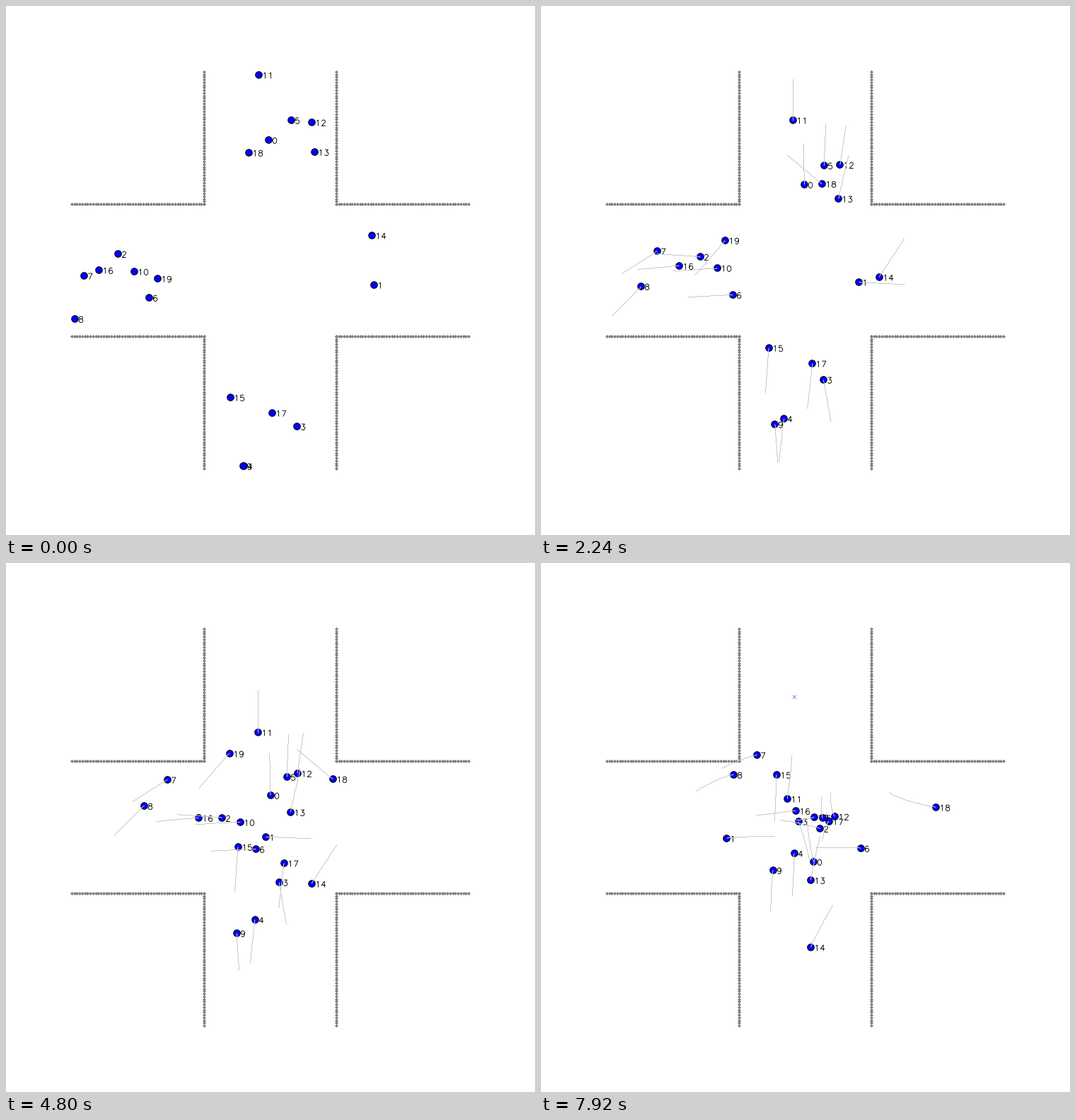
These frames come from a looping animation (748x748 px, 8 s). A matplotlib script:

```python
import numpy as np
import matplotlib.pyplot as plt
from matplotlib.animation import FuncAnimation
from matplotlib.collections import LineCollection, PolyCollection

SIZE, DPI = 748, 100
PX = 72 / DPI
FRAMES, INTERVAL = 100, 80
CROSSING, LAST = 60, FRAMES - 1
TRAIL = 25
GOAL, GOAL_WALKER, GOAL_FRAME = (358.5, 189.5), 19, 93

# Each walker: entry point, point at the CROSSING frame, point at the LAST frame.
NORTH = {
    0: [(371, 189), (374, 328), (385, 422)],
    5: [(403, 161), (397, 302), (398, 360)],
    11: [(357, 97), (356, 239), (348, 333)],
    12: [(432, 164), (412, 297), (415, 358)],
    13: [(436, 206), (402, 352), (381, 448)],
    18: [(343, 207), (462, 305), (558, 345)],
}
WEST = {
    2: [(158, 350), (305, 360), (394, 375)],
    6: [(202, 412), (353, 404), (452, 403)],
    7: [(110, 381), (228, 306), (305, 271)],
    8: [(97, 442), (195, 343), (272, 299)],
    10: [(181, 375), (331, 366), (386, 359)],
    16: [(131, 373), (272, 360), (360, 350)],
    19: [(214, 385), (316, 269), (365, 174)],
}
SOUTH = {
    3: [(411, 594), (386, 451), (364, 365)],
    4: [(336, 650), (352, 504), (358, 410)],
    9: [(335, 650), (326, 523), (328, 434)],
    15: [(317, 553), (328, 401), (333, 299)],
    17: [(376, 575), (393, 424), (407, 365)],
}
EAST = {
    1: [(520, 394), (367, 387), (262, 389)],
    14: [(517, 324), (432, 453), (381, 543)],
}


def walk(entry, crossing, end):
    """Soft start, steady pace to the crossing, then a steady turn or slow-down."""
    entry, crossing, end = map(np.array, (entry, crossing, end))
    t = np.arange(FRAMES)[:, None]
    pace = (t - 1 + np.exp(-t / 2)) / (CROSSING - 1)
    velocity = (crossing - entry) / CROSSING
    rest = LAST - CROSSING
    bend = (end - crossing - velocity * rest) / rest**2
    late = t - CROSSING
    path = np.where(late < 0, entry + (crossing - entry) * pace,
                    crossing + velocity * late + bend * late**2)
    return np.floor(path) + 0.5


def polygons(centers, radius, sides):
    a = np.arange(sides) * 2 * np.pi / sides
    ring = radius * np.column_stack([np.cos(a), np.sin(a)])
    return np.asarray(centers)[:, None] + ring


def arc(cx, cy, rx, ry, start=0, end=360):
    a = np.radians(np.linspace(start, end, 15))
    return [(cx + rx * c, cy + ry * s) for c, s in zip(np.cos(a), np.sin(a))]


# Single-stroke digits on a 20 x 21 cell, y upwards.
SIX = arc(10.5, 13, 6, 8, 35, 180) + arc(10.5, 6.5, 6.5, 6.5, 180, 540)
DIGITS = {
    "0": arc(10, 10.5, 7, 10.5),
    "1": [(6, 17), (8, 18), (11, 21), (11, 0)],
    "2": arc(10, 15.5, 6, 5.5, 170, -30) + [(3, 0), (17, 0)],
    "3": [(5, 21), (16, 21), (10, 13)] + arc(10, 6.5, 7, 6.5, 90, -155),
    "4": [(13, 0), (13, 21), (3, 7), (18, 7)],
    "5": [(15, 21), (5, 21), (4, 12)] + arc(10, 7, 7, 7, 130, -155),
    "6": SIX,
    "7": [(3, 21), (17, 21), (7, 0)],
    "8": arc(10, 16.8, 6, 4.2, -90, 270) + arc(10, 6.3, 7, 6.3, 90, 450),
    "9": [(20 - x, 21 - y) for x, y in SIX],
}


def label_strokes(number, scale=0.4):
    return [np.array([(4.5 + scale * (20 * i + x), 5 - scale * y)
                      for x, y in DIGITS[ch]])
            for i, ch in enumerate(str(number))]


def wall_points():
    """Four corners of the crossing, mirrored about the stage centre."""
    run = np.linspace(SIZE / 8, 3 * SIZE / 8, 51)
    edge = np.full_like(run, 3 * SIZE / 8)
    x, y = np.append(run, edge), np.append(edge, run)
    points = np.vstack([np.column_stack([px, py])
                        for px in (x, SIZE - x) for py in (y, SIZE - y)])
    return np.floor(points) + 0.5


routes = {**NORTH, **WEST, **SOUTH, **EAST}
paths = {n: walk(*routes[n]) for n in sorted(routes)}
labels = {n: label_strokes(n) for n in paths}

fig = plt.figure(figsize=(SIZE / DPI, SIZE / DPI), dpi=DPI, facecolor="white")
ax = fig.add_axes([0, 0, 1, 1])
ax.set_xlim(0, SIZE)
ax.set_ylim(SIZE, 0)
ax.axis("off")

walls = PolyCollection(polygons(wall_points(), 2.5, 4), facecolors="#808080",
                       linewidths=0, zorder=1)
text = LineCollection([], colors="black", linewidths=0.9 * PX, zorder=2)
dots = PolyCollection([], facecolors="#0000ff", edgecolors="black",
                      linewidths=PX, zorder=3)
trails = LineCollection([], colors="#c8c8c8", linewidths=PX, zorder=4)
gx, gy = GOAL
goal = LineCollection([[(gx - 2.5, gy - 2.5), (gx + 2.5, gy + 2.5)],
                       [(gx - 2.5, gy + 2.5), (gx + 2.5, gy - 2.5)]],
                      colors="#7070f0", linewidths=0.8 * PX, zorder=5)
for artist in (walls, text, dots, trails, goal):
    ax.add_collection(artist)


def update(frame):
    arrived = frame >= GOAL_FRAME
    active = [n for n in paths if not (arrived and n == GOAL_WALKER)]
    dots.set_verts(polygons([paths[n][frame] for n in active], 4.8, 24))
    trails.set_segments([paths[n][max(0, frame - TRAIL):frame + 1] for n in active])
    text.set_segments([paths[n][frame] + s for n in active for s in labels[n]])
    goal.set_visible(arrived)
    return text, dots, trails, goal


anim = FuncAnimation(fig, update, frames=FRAMES, interval=INTERVAL,
                     repeat=True, repeat_delay=0)
plt.show()
```
